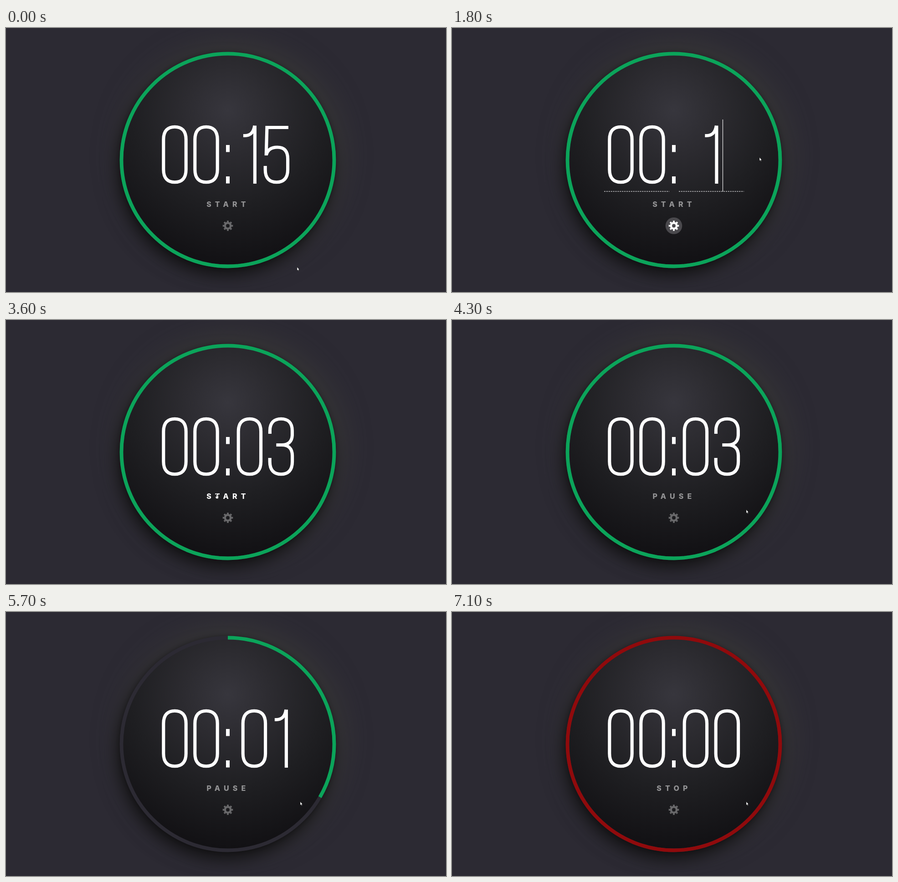
These frames come from a looping animation (966x580 px, 7.2 s). An HTML page:

```html
<!DOCTYPE html>
<html lang="en">
<head>
<meta charset="utf-8">
<title>Countdown timer</title>
<style>
  html, body { margin: 0; width: 100%; height: 100%; overflow: hidden; background: #2c2a33; }
  #stage { position: absolute; left: 0; top: 0; width: 966px; height: 580px; overflow: hidden; }
  #face {
    position: absolute; left: 250px; top: 53px; width: 474px; height: 474px; border-radius: 50%;
    background: radial-gradient(circle 345px at 50% 27%, #37363d 0, #2c2b30 28%, #1f1f22 60%, #111013 100%);
    box-shadow: 0 0 8px rgba(0, 0, 0, .3), -6px 17px 34px rgba(0, 0, 0, .64),
                8px -10px 60px 4px rgba(64, 64, 60, .72);
  }
  svg { position: absolute; left: 0; top: 0; }
  .ring { fill: none; stroke-width: 7.8; }
  .digits { fill: none; stroke: #fff; stroke-width: 7.1; }
  #label { font: 800 16px Inter, "Open Sans", sans-serif; letter-spacing: 8.2px; text-anchor: middle; fill: #fff; }
  #gear { fill: none; stroke: #fff; }
</style>
</head>
<body>
<div id="stage">
  <div id="face"></div>
  <svg width="966" height="580">
    <circle class="ring" cx="487" cy="290" r="233.5" stroke="#2c2a33"/>
    <circle class="ring" id="ring" cx="487" cy="290" r="233.5" pathLength="3" transform="rotate(-90 487 290)"/>
    <g class="digits" id="minutes"></g>
    <path fill="#fff" d="M483 257h8v15.5h-8zM483 326h8v15.5h-8z"/>
    <g class="digits" id="seconds"></g>
    <g id="edit">
      <path d="M334 359H477M498 359H641" stroke="#c4c4c6" stroke-width="1.3" stroke-dasharray="3 1.9"/>
      <path id="caret" d="M0 201V359" stroke="#f2f2f2" stroke-width="1.2"/>
    </g>
    <text id="label" x="487.5" y="392.5"></text>
    <circle id="halo" cx="487" cy="434.5" r="18.3" fill="#4a494d"/>
    <g id="gear" transform="translate(487 434.5)">
      <circle r="6.2" stroke-width="4.6"/>
      <circle r="9.4" stroke-width="3.8" pathLength="16" stroke-dasharray="1 1" stroke-dashoffset=".5"/>
    </g>
    <g id="cursor" stroke-linejoin="round"></g>
  </svg>
</div>
<script>
const $ = id => document.getElementById(id);
const LOOP = 7200, STEP = 100, MINUTES_X = 405, SECONDS_X = 569.4;

const bowl = 'V311C59.2 330 50 338.8 34.5 338.8S9.8 330 9.8 311';
const glyphs = {
  0: { w: 69, d: 'M9.8 245C9.8 226 19 217.3 34.5 217.3S59.2 226 59.2 245' + bowl + 'Z' },
  1: { w: 49, d: 'M10.5 236.5H14C27 236.5 33 229 35.5 214.5M36 214.5V342' },
  2: { w: 69, d: 'M11 251V243C11 226 20 217.3 35 217.3S59 226 59 244C59 270 46 282 28 303C16 317 12 324 12 338.5H61' },
  3: { w: 69, d: 'M10 250V243C10 226 19 217.3 34.5 217.3S59 226 59 243V252C59 267 50 274.5 36 274.5H24' +
                 'M36 274.5C50 274.5 59.2 282 59.2 298' + bowl + 'V303' },
  5: { w: 69, d: 'M60.5 218.5H13.5L11.8 280M12 279C15 267 24 262 36 262C51 262 59.2 270 59.2 288' + bowl + 'V303' }
};

const cursors = {
  arrow: '<path d="M0 0V8L1.8 6.4 3 9 4.2 8.4 3.1 6H5.2Z" fill="#fff" stroke="#111" stroke-width=".6"/>',
  beam: '<path d="M-2 -5H2M-2 5H2M0 -5V5" stroke="#98979b" stroke-width="1"/>',
  hand: '<path d="M-1.5 -4.5H0V-1L3.5 0V3L2.3 5.5H-1.5L-4 1.5-3 .7-1.5 2Z" fill="#fff" stroke="#222" stroke-width=".8"/>'
};

// [time, x, y]
const path = [
  [0, 639, 525], [100, 639, 525], [800, 487, 435], [900, 487, 435], [1100, 547, 260],
  [1200, 547, 260], [1500, 675, 284], [2600, 675, 284], [3200, 487, 435], [3300, 487, 435],
  [3500, 463, 387], [3700, 463, 387], [4200, 646, 416.5], [LOOP, 646, 416.5]
];

// [time, seconds, label, ring thirds]
const states = [
  [0, '15', 'START', 3], [1800, '1', 'START', 3], [2000, '', 'START', 3], [2400, '3', 'START', 3],
  [3300, '03', 'START', 3], [3700, '03', 'PAUSE', 3], [4700, '02', 'PAUSE', 2],
  [5600, '01', 'PAUSE', 1], [6700, '00', 'STOP', 3]
];

const ease = k => k * k * (3 - 2 * k);
const width = text => [...text].reduce((sum, c) => sum + glyphs[c].w, 0);

function pointer(t) {
  const i = path.findIndex(p => p[0] > t);
  const [t0, x0, y0] = path[i - 1], [t1, x1, y1] = path[i];
  const k = ease((t - t0) / (t1 - t0));
  return [x0 + (x1 - x0) * k, y0 + (y1 - y0) * k];
}

function drawDigits(group, text, center) {
  let x = center - width(text) / 2;
  group.innerHTML = [...text].map(c => {
    const g = `<path transform="translate(${x} 0)" d="${glyphs[c].d}"/>`;
    x += glyphs[c].w;
    return g;
  }).join('');
}

function render(t) {
  const [, text, label, thirds] = states.filter(s => s[0] <= t).pop();
  const [x, y] = pointer(t);
  const editing = t >= 900 && t < 3300;
  const onGear = Math.hypot(x - 487, y - 434.5) < 18;
  const onLabel = !editing && Math.abs(x - 487) < 48 && Math.abs(y - 387) < 9;
  const onDigits = editing && Math.abs(x - SECONDS_X) < 71 && y > 200 && y < 359;

  drawDigits($('seconds'), text, SECONDS_X);
  $('label').textContent = label;
  $('label').setAttribute('fill-opacity', onLabel ? 1 : .52);
  $('ring').setAttribute('stroke-dasharray', thirds + ' 3');
  $('ring').setAttribute('stroke', label === 'STOP' ? '#900a0c' : '#0ba45a');

  $('edit').style.display = editing ? '' : 'none';
  const before = text === '15' ? '1' : text;
  const caretX = SECONDS_X - width(text) / 2 + width(before) + .6;
  $('caret').setAttribute('transform', `translate(${caretX} 0)`);
  $('caret').style.display = t >= 1100 ? '' : 'none';

  const lit = editing || onGear;
  $('halo').style.display = lit ? '' : 'none';
  $('gear').setAttribute('opacity', lit ? 1 : .34);

  const kind = onGear || onLabel ? 'hand' : onDigits ? 'beam' : 'arrow';
  $('cursor').innerHTML = cursors[kind];
  $('cursor').setAttribute('transform', `translate(${x} ${y})`);
}

drawDigits($('minutes'), '00', MINUTES_X);
const start = performance.now();
let last = -1;
function tick() {
  const t = Math.floor((performance.now() - start) % LOOP / STEP) * STEP;
  if (t !== last) render(last = t);
  requestAnimationFrame(tick);
}
tick();
</script>
</body>
</html>
```
